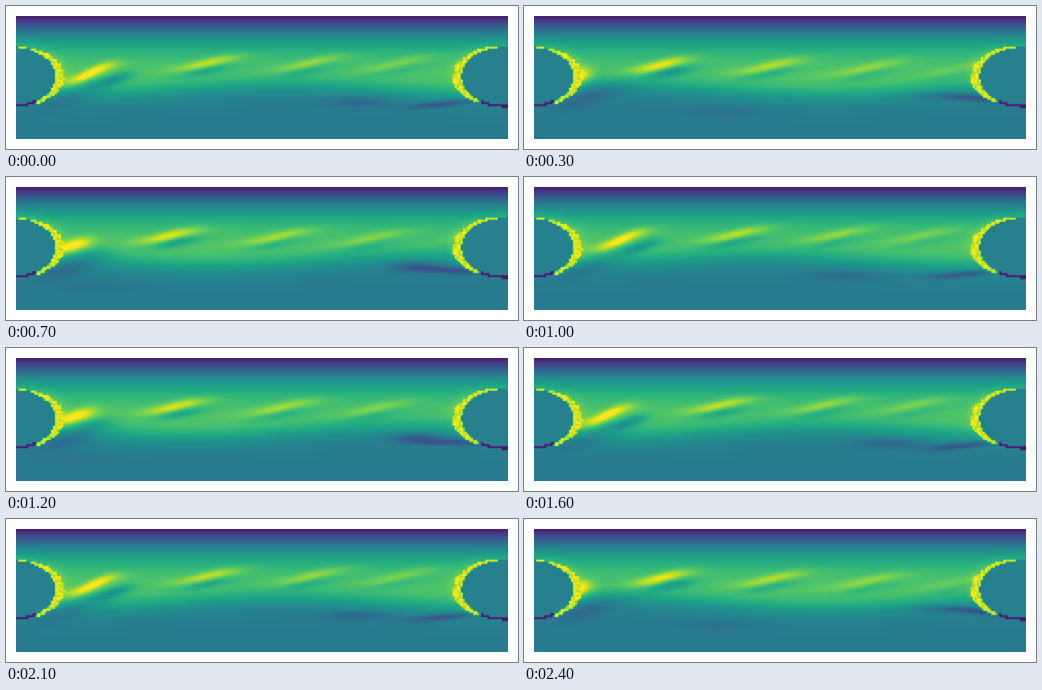
Animation, 512 px wide and 143 px high, one loop 2.5 s. Source, as a matplotlib script:

```python
import numpy as np
import matplotlib.pyplot as plt
from matplotlib.animation import FuncAnimation

W, H, DPI = 512, 143, 100
LEFT, TOP, FIELD_W, FIELD_H = 10, 10, 492, 123
NX, NY = 240, 60
FRAMES, INTERVAL = 25, 100
CYCLES_PER_FRAME = 0.81  # vortices shed between two samples
CALM, SOLID = 0.415, 0.435

rng = np.random.default_rng(4)
X, Y = np.meshgrid(LEFT + (np.arange(NX) + 0.5) * FIELD_W / NX,
                   TOP + (np.arange(NY) + 0.5) * FIELD_H / NY)
SPECKLE = rng.normal(size=X.shape)

# The obstacle wraps around the periodic left/right border.
CX, CY, RX, RY = 498.5, 70.5, 43.5, 29.5
DX = (X - CX + FIELD_W / 2) % FIELD_W - FIELD_W / 2
DY = Y - CY
R = np.hypot(DX / RX, DY / RY)
GAP = (R - 1) * np.hypot(DX, DY) / R  # distance from the wall in pixels
SIDE = np.abs(DX) / RX


def blob(x, y, strength, length, thick, slope=0.0):
    """Gaussian streak along an S-shaped axis."""
    dx = X - x
    axis = y + slope * length * np.tanh(dx / length)
    return strength * np.exp(-(dx / length) ** 2 - ((Y - axis) / thick) ** 2)


def ramp(t, start, end):
    t = np.clip((t - start) / (end - start), 0, 1)
    return t * t * (3 - 2 * t)


def shear_flow(phase):
    """Boundary layer at the top, fading into calm fluid along a wavy edge."""
    upper = 0.08 + 0.7 * (1 - np.exp(-((Y - TOP) / 24) ** 1.2))
    edge = 83 + 5 * np.cos(2 * np.pi * ((X - 490) / 430 + phase))
    flow = CALM + (upper - CALM) * 0.5 * (1 - np.tanh((Y - edge) / 12))
    halo = 0.11 * np.exp(-(GAP / 10) ** 2 - ((DY + 8) / 22) ** 2)
    return flow + halo * (1 + 0.25 * SPECKLE)


def streak(age):
    """Bright vortex sheet with the dark eddy rolling up beneath it."""
    old, young = max(age, 0), max(-age, 0)
    x = 85 + 122 * old - 6.5 * old ** 2 - 55 * young
    y = 57.5 + 9.5 * np.exp(-6 * old) + 5 * young
    y += old * (1 - np.cos(2 * np.pi * age))
    slope = -0.25 - 0.23 * np.exp(-(age / 0.25) ** 2)
    length = 38 - 14 * np.exp(-age)
    fade = np.exp(-0.38 * old) * (1 - ramp(age, 3, 4))
    bright = 0.34 * fade * ramp(age, -1, -0.5)
    dark = -0.2 * fade * ramp(age, -0.5, 0)
    return (blob(x, y, bright, length, 4.8 + 4 * young, slope)
            + blob(x + 22 - 25 * min(old, 1), y + 7, dark,
                   0.8 * length, 5, 0.7 * slope))


def patch(age):
    """Slow dark patch, shed from the right and drifting left."""
    drift = max(age, 0)
    strength = -0.17 * np.exp(-1.8 * drift) * ramp(age, -0.5, 0)
    return blob(410 - 340 * drift ** 1.4, 90 + 22 * drift,
                strength, 24 + 30 * min(abs(age), 0.6), 5)


def wall_layer(phase):
    swing = np.cos(2 * np.pi * phase)
    return blob(445 - 8 * swing, 95 + 3 * swing, -0.2, 34, 3.2, -0.11 * swing)


def add_walls(field):
    ring = (GAP > -0.5) & (GAP < 1 + 5 * SIDE ** 2 + 0.4 * SPECKLE)
    ring &= (DY < 0) | (SIDE > 0.56)
    field[R < 1] = SOLID
    field[ring] = np.clip(0.96 + 0.06 * SPECKLE, 0.75, 1)[ring]
    field[(np.abs(GAP) < 1.3) & (DY > 0) & (SIDE < 0.54)] = 0.06


def vorticity(i):
    phase = CYCLES_PER_FRAME * i % 1
    field = shear_flow(phase) + wall_layer(phase)
    field += blob(68, 89, -0.11, 38, 9, -0.3)
    field += sum(streak(phase + k) for k in range(-1, 4))
    field += sum(patch(phase + k - 0.72) for k in range(2))
    add_walls(field)
    return np.clip(field, 0, 1)


fig = plt.figure(figsize=(W / DPI, H / DPI), dpi=DPI, facecolor="white")
ax = fig.add_axes([LEFT / W, (H - TOP - FIELD_H) / H, FIELD_W / W, FIELD_H / H])
ax.axis("off")
image = ax.imshow(vorticity(0), cmap="viridis", vmin=0, vmax=1, aspect="auto")


def update(i):
    image.set_data(vorticity(i))
    return [image]


anim = FuncAnimation(fig, update, frames=FRAMES, interval=INTERVAL,
                     repeat=True, repeat_delay=0, blit=False)
plt.show()
```
